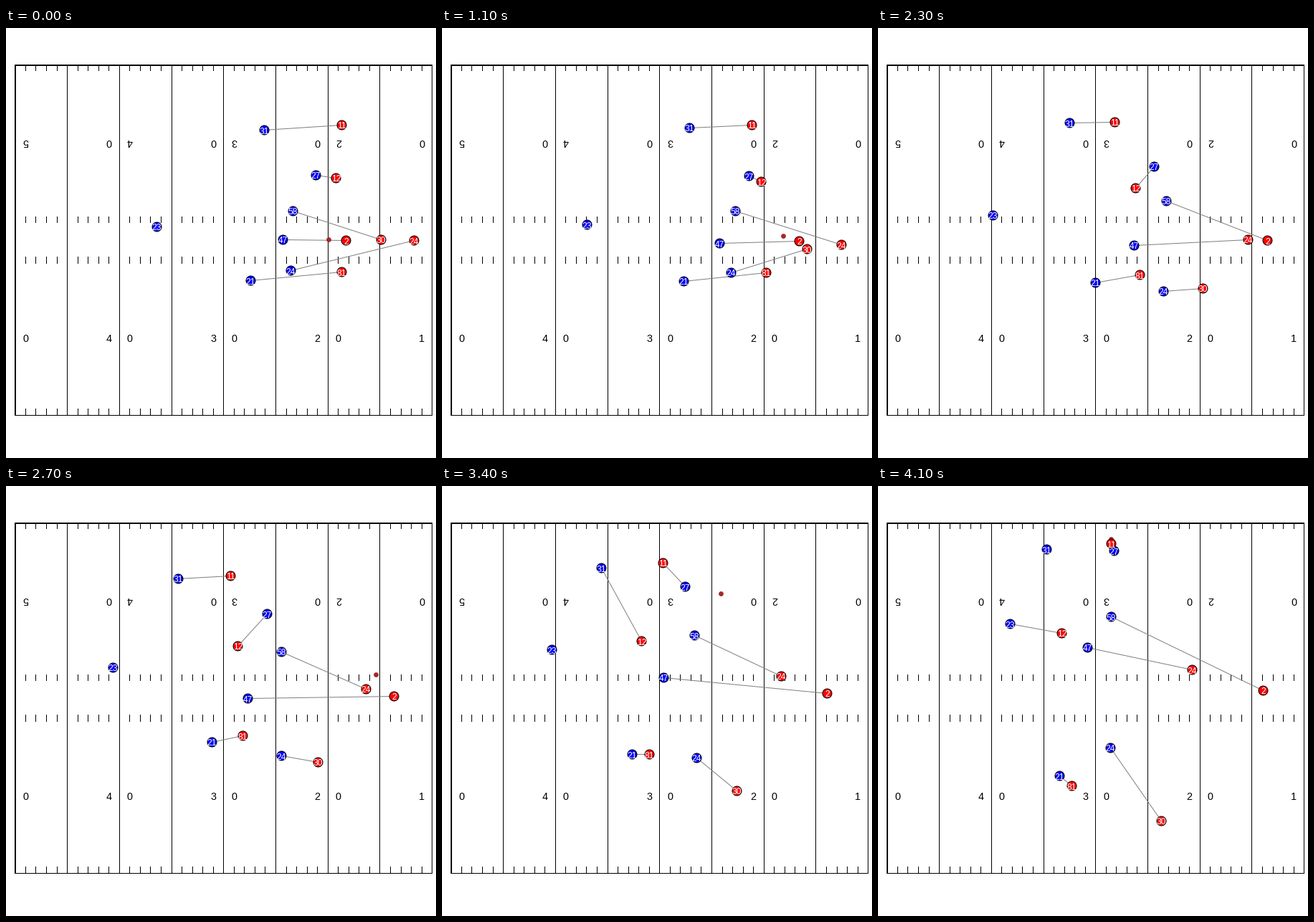
Write a matplotlib script that moves like this. It is 600 px wide and 600 px high and loops after 7200 ms.

```python
from itertools import permutations

import numpy as np
import matplotlib.pyplot as plt
from matplotlib.animation import FuncAnimation
from matplotlib.patches import Circle

FRAMES, INTERVAL = 72, 100
SNAP, DROPPED, THROW, CATCH, END = 4, 23, 25, 38, 41
PX = 0.72  # points per pixel at 100 dpi
FONT = "Liberation Sans"

# Key points of each run: at the snap, while dropping back, in the air, at the end
KEY_STEPS = np.array([SNAP, 18, 30, END])
DEFENCE = [
    ("31", [(360, 142), (304, 134), (227, 124), (235, 88)]),
    ("27", [(432, 205), (409, 203), (351, 164), (329, 90)]),
    ("58", [(400, 255), (415, 250), (370, 222), (325, 182)]),
    ("47", [(386, 295), (377, 305), (323, 286), (292, 225)]),
    ("24", [(397, 338), (407, 353), (372, 380), (324, 365)]),
    ("21", [(341, 352), (322, 355), (276, 362), (253, 404)]),
    ("23", [(210, 277), (180, 268), (146, 244), (184, 192)]),
]
OFFENCE = [
    ("11", [(468, 135), (366, 134), (307, 119), (325, 80)]),
    ("12", [(460, 209), (403, 221), (300, 221), (256, 205)]),
    ("2", [(474, 296), (534, 298), (539, 291), (537, 285)]),
    ("30", [(523, 295), (478, 338), (423, 402), (395, 467)]),
    ("24", [(569, 296), (532, 305), (491, 274), (438, 256)]),
    ("81", [(468, 340), (408, 343), (309, 356), (270, 418)]),
]
RECEIVER, PASSER = 0, 2
BALL_SPOT = np.array([450, 295])


def spline(steps, points, t):
    """Cubic spline through points (steps first), starting at rest."""
    n = len(steps)
    h = np.diff(steps)[:, None, None]
    d = np.diff(points, axis=0) / h
    a = np.zeros((n, n))
    rhs = np.zeros(points.shape)
    a[0, 0] = 1
    for i in range(1, n - 1):
        left, right = 1 / h[i - 1].item(), 1 / h[i].item()
        a[i, i - 1:i + 2] = left, 2 * (left + right), right
        rhs[i] = 3 * (d[i - 1] * left + d[i] * right)
    a[-1, -2:] = 1, 2
    rhs[-1] = 3 * d[-1]
    m = np.linalg.solve(a, rhs.reshape(n, -1)).reshape(points.shape)

    t = np.maximum(t, steps[0])
    k = np.clip(np.searchsorted(steps, t, side="right") - 1, 0, n - 2)
    s = (t - steps[k])[:, None, None] / h[k]
    return (points[k] * (1 + 2 * s) * (1 - s) ** 2
            + points[k + 1] * s * s * (3 - 2 * s)
            + h[k] * m[k] * s * (1 - s) ** 2
            + h[k] * m[k + 1] * s * s * (s - 1))


def paths(team):
    points = np.array([run for _, run in team], float).transpose(1, 0, 2)
    return np.round(spline(KEY_STEPS, points, np.arange(END + 1)))


blue_path, red_path = paths(DEFENCE), paths(OFFENCE)
PAIRINGS = np.array(list(permutations(range(len(DEFENCE)), len(OFFENCE))))


def match(blue, red):
    """Defender index for each attacker, with the least total distance."""
    dist = np.linalg.norm(blue[:, None] - red[None], axis=2)
    total = dist[PAIRINGS, np.arange(len(red))].sum(axis=1)
    return PAIRINGS[total.argmin()]


def ball_at(t):
    """Snap to the passer, straight throw, then carried by the receiver."""
    if t < THROW:
        u = np.clip((t - SNAP) / (DROPPED - SNAP), 0, 1) ** 0.6
        lift = np.array([0, -6 * np.sin(np.pi * u)])
        return BALL_SPOT + (red_path[t, PASSER] - BALL_SPOT) * u + lift
    u = min((t - THROW) / (CATCH - THROW), 1)
    release = red_path[THROW, PASSER] + (9, 0)
    hands = red_path[max(t, CATCH), RECEIVER] + (0, -6)
    return release + (hands - release) * u


fig = plt.figure(figsize=(6, 6), dpi=100, facecolor="white")
ax = fig.add_axes([0, 0, 1, 1])
ax.set_xlim(-0.5, 599.5)
ax.set_ylim(599.5, -0.5)
ax.axis("off")


def line(x, y, width=1, color="black", z=1):
    return ax.plot(x, y, color=color, lw=width * PX, snap=False,
                   solid_capstyle="butt", zorder=z)[0]


def text(x, y, label, size, color, z, **style):
    return ax.text(x, y, label, ha="center", va="center", family=FONT,
                   fontsize=size * PX, color=color, zorder=z, **style)


def draw_field():
    left, top, right, bottom = 12, 51, 594, 540
    yard = 14.544
    for i in range(1, 40):
        x = round(12.4 + yard * i)
        if i % 5 == 0:
            line([x, x], [top, bottom])
            continue
        for y, length in ((52, 8), (263, 9), (319, 10), (531, 10)):
            line([x, x], [y - 0.5, y + length - 0.5])
    line([left + 0.5] * 2, [top - 0.5, bottom + 0.5], 2)
    line([left - 0.5, right + 0.5], [top + 0.5] * 2, 2)
    line([right] * 2, [top, bottom])
    line([left, right + 0.5], [bottom] * 2)

    for i in range(4):
        x = 12.4 + 10 * yard * i
        for dx, low, high in ((yard, "0", 5 - i), (9 * yard, 4 - i, "0")):
            text(x + dx, 433.5, low, 14.4, "black", 1)
            text(x + dx, 158.5, high, 14.4, "black", 1, rotation=180)


def make_team(team, color, z):
    dots = [ax.add_patch(Circle((0, 0), 6.5, fc=color, ec="black", lw=PX,
                                zorder=z)) for _ in team]
    labels = [text(0, 0, number, 12, "white", 6) for number, _ in team]
    return dots, labels


def place(team, points):
    for dot, label, (x, y) in zip(*team, points):
        dot.center = x, y
        label.set_position((x, y + 2))


draw_field()
links = [line([], [], color="#7f7f7f", z=2) for _ in OFFENCE]
ball = ax.add_patch(Circle(BALL_SPOT, 3.4, fc="brown", ec="none", zorder=3))
blue_team = make_team(DEFENCE, "#0000ff", 4)
red_team = make_team(OFFENCE, "#ff0000", 5)


def update(frame):
    t = min(frame, END)
    blue, red = blue_path[t], red_path[t]
    place(blue_team, blue)
    place(red_team, red)
    for link, mark, runner in zip(links, blue[match(blue, red)], red):
        link.set_data([mark[0], runner[0]], [mark[1], runner[1]])
    ball.center = np.round(ball_at(t))
    return [*links, ball]


anim = FuncAnimation(fig, update, frames=FRAMES, interval=INTERVAL,
                     repeat=True, repeat_delay=0, blit=False)
plt.show()
```
